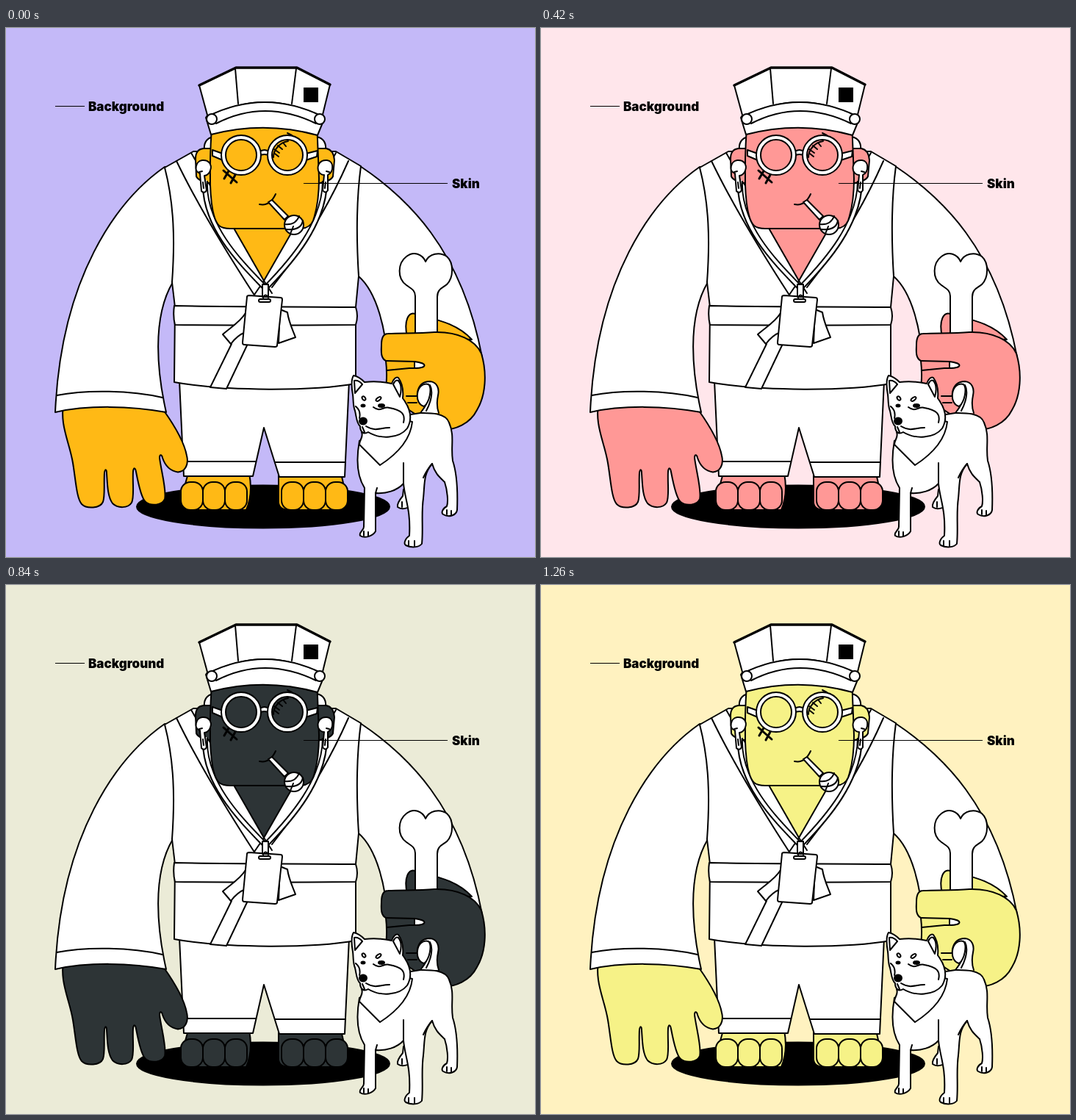
Write an HTML page that moves like this. It is 720x720 px and loops after 1400 ms.

```html
<!DOCTYPE html>
<html lang="en">
<head>
<meta charset="utf-8">
<title>Colour traits</title>
<style>
  html, body { margin: 0; width: 100%; height: 100%; overflow: hidden; }
  svg { display: block; width: 100vw; height: 100vh; }
  .ink { fill: #fff; stroke: #000; stroke-width: 2; stroke-linejoin: round; stroke-linecap: round; }
  .skin { fill: var(--skin); }
  .line { fill: none; }
  .solid { fill: #000; }
  text { font: 900 17px Inter, "Open Sans", sans-serif; }
  .bits { font: 7px "Noto Sans Mono", monospace; fill: #5bb4ff; }
</style>
</head>
<body>
<svg id="stage" viewBox="0 0 720 720">
  <defs>
    <linearGradient id="sky" x2="0" y2="1">
      <stop stop-color="#d0641f"/><stop offset=".4" stop-color="#e29d2f"/><stop offset=".85" stop-color="#fbdc4c"/><stop offset="1" stop-color="#fbdc4c"/>
    </linearGradient>
    <linearGradient id="dune" x2="0" y2="1">
      <stop stop-color="#fadb4b"/><stop offset="1" stop-color="#e7861f"/>
    </linearGradient>
    <linearGradient id="shade" x2="0" y2="1">
      <stop stop-color="#e08a28"/><stop offset="1" stop-color="#c95c22"/>
    </linearGradient>
    <radialGradient id="glow">
      <stop stop-color="#1c6cff" stop-opacity=".85"/><stop offset=".5" stop-color="#0c45d0" stop-opacity=".45"/><stop offset="1" stop-color="#0a36b0" stop-opacity="0"/>
    </radialGradient>
  </defs>

  <rect id="plain" width="720" height="720"/>

  <g id="desert">
    <rect width="720" height="330" fill="url(#sky)"/>
    <g fill="none" stroke="#fffad5" stroke-linejoin="round" stroke-linecap="round">
      <path transform="translate(45 10) skewX(-9.3)" stroke-width="72" d="M36 221V36H143V221"/>
      <path transform="translate(223 10) skewX(-9.3)" stroke-width="70" d="M35 35H126V210H35Z"/>
      <path transform="translate(385 10) skewX(-9.3)" stroke-width="70" d="M35 200V35H132V200"/>
      <path transform="translate(556 10) skewX(-9.3)" stroke-width="68" d="M34 34H124V180H34Z"/>
    </g>
    <g fill="#cbb9a2">
      <path d="M0 317C40 303 78 270 96 259C110 253 125 262 145 265L260 305V360H0Z"/>
      <path d="M557 335V238H562V184H569V190H574V179H584V135H587V140C600 134 605 146 614 141L633 143L627 149L633 154C615 160 605 147 587 153V179H594V188H599V179H605V185H612V232H622V214L632 184L641 212V265L645 280L652 291L646 305C680 287 695 312 720 317V345H540Z"/>
      <path d="M534 240L541 211L550 240V310H534Z"/>
    </g>
    <path fill="url(#dune)" d="M0 322C70 316 120 286 190 304C280 330 400 330 480 320C560 345 650 330 720 312V410H0Z"/>
    <path fill="url(#shade)" d="M470 350C510 340 560 360 610 372C650 386 690 385 720 388V415L500 445H470Z"/>
    <path fill="url(#dune)" d="M0 402C50 380 110 352 190 361C290 410 410 450 505 440C570 412 650 398 720 402V580H0Z"/>
    <path fill="url(#dune)" d="M0 549C100 544 200 550 330 545C470 540 600 528 720 525V720H0Z"/>
  </g>

  <g id="circuit">
    <rect width="720" height="720" fill="#041246"/>
    <g id="wires" fill="none"></g>
  </g>

  <g class="ink">
    <ellipse class="solid" cx="350" cy="651.500" rx="172" ry="29"/>

    <!-- feet and trousers -->
    <path class="skin" d="M248 606L243 624V656H327C334 640 334 622 331 606Z"/>
    <path class="skin" d="M371 606V646Q372 656 386 656H455L460 624L456 606Z"/>
    <g id="toes" class="skin"></g>
    <path d="M236 480L242 610H336L351 544L372 611H461L467 480Z"/>
    <path class="line" d="M241 590H340M366 591H462"/>

    <!-- resting arm -->
    <path class="skin" d="M79 506C72 540 86 562 91 592C95 616 96 640 103 648C110 655 128 654 132 645C135 637 133 620 134 605C135 600 137 600 137 606C138 620 138 638 145 647C152 654 166 654 171 646C175 638 172 620 173 603C174 598 176 598 177 604C180 620 184 640 190 645C197 651 213 650 216 641C219 630 211 602 209 585C209 580 212 580 213 585C217 597 224 603 234 604.500C244 604 249 594 246 582C243 566 232 545 215 521L208 506Z"/>
    <path d="M216 189C150 235 75 340 67 523C110 513 170 514 218 523C206 470 198 395 227 346L250 200Z"/>
    <path class="line" d="M69 500C110 492 170 493 213 503"/>

    <!-- raised arm -->
    <path d="M482 188C545 230 620 300 648 448L520 458C517 410 505 360 480 338L460 200Z"/>

    <!-- jacket -->
    <path d="M216 190L255 168H449L483 188C476 240 477 290 480 338L476 380V484C420 494 300 495 229 482L230 380L226 346C230 290 229 240 216 190Z"/>
    <path class="line" d="M232 181C258 235 300 305 339 365M252 170L280 218M466 181C440 240 404 300 362 353M449 170L420 222"/>
    <path class="skin" d="M304 262L351 344L398 262Z"/>
    <path class="line" d="M351 344L338 363M351 344L362 361"/>
    <path d="M229 378C310 380 390 379 476 380Q480 392 476 404C390 405 310 405 230 404Q227 392 229 378Z"/>
    <path d="M326 388C319 400 305 408 295 417L306 430C312 422 318 417 326 414ZM373 383L383 387C385 401 390 410 394 421L371 429Z"/>
    <path d="M307 430L278 489L300 491L328 432"/>

    <!-- ears -->
    <path d="M270 168Q268 151 282 148V168ZM435 168Q437 151 423 148V168Z"/>
    <path class="skin" d="M280 164H269Q258 165 258 178L259 202Q262 209 282 212ZM424 164H436Q446 166 447 180L445 202Q442 209 422 212Z"/>
  </g>

  <!-- lanyard -->
  <g fill="none">
    <path stroke="#000" stroke-width="8" d="M271 208C268 268 318 318 351 352M434 208C434 266 388 318 355 352"/>
    <path stroke="#fff" stroke-width="4" d="M271 207C268 268 318 318 352 353M434 207C434 266 388 318 354 353"/>
  </g>

  <g class="ink">
    <path d="M331 364L374 367Q376 367 376 370L369 432Q369 434 366 434L324 431Q322 431 322 428L328 366Q328 364 331 364Z"/>
    <rect x="349" y="349" width="8" height="17"/>
    <path class="line" d="M350 367Q353 360 357 367"/>
    <rect x="344" y="369" width="16" height="4" rx="2"/>

    <!-- face -->
    <path class="skin" d="M281 125C277 165 278 190 278 213C279 245 283 262 290 269Q295 273 305 273H402Q414 272 418 262C424 245 426 225 426 205L423 125Z"/>
    <path d="M264 198C255 195 258 181 267 180C276 179 281 186 278 194C277 198 273 201 270 201L273 221Q270 226 266 222Z"/>
    <path d="M438 200C447 195 446 181 437 180C428 179 423 186 425 194C427 199 431 200 433 200L431 221Q435 226 438 221Z"/>
    <path class="line" d="M263 196L267 195M440 196L436 195M268 210L269 218M435 210L434 218"/>
    <path class="line" d="M345 240Q359 243 367 226"/>
    <path d="M357 237L362 234L384 256L379 261Z"/>
    <circle cx="392" cy="268" r="13"/>
    <path class="line" d="M379 267Q394 269 399 256M381 274Q402 276 404 262M391 270L387 280"/>
    <path class="line" stroke-width="3" d="M296 194L314 210M297 205L304 193M306 211L312 200"/>

    <!-- glasses -->
    <path d="M281 166L295 171V180L281 174ZM424 167L408 171V180L423 175Z"/>
    <path d="M344 169Q352 163 359 169V174Q352 170 344 174Z"/>
    <circle cx="320" cy="173" r="27"/><circle cx="383" cy="173" r="27"/>
    <circle class="skin" cx="320" cy="173" r="21"/><circle class="skin" cx="383" cy="173" r="21"/>
    <path class="line" d="M364 176C364 166 372 156 384 154M365 165L372 170M370 160L376 165M377 156L381 161M366 171L371 175M383 143L389 146"/>

    <!-- cap -->
    <path d="M272 122L279 145Q352 126 424 146L433 124L426 110H280Z"/>
    <path d="M263 78L313 54H396L441 77L430 122Q352 80 275 122Z"/>
    <path class="line" stroke-width="3.500" d="M263 78L313 54H396L441 77"/>
    <path class="line" d="M312 55L316 103M395 55L389 103"/>
    <path d="M275 120Q352 82 430 120L422 130Q352 96 286 130Z"/>
    <circle cx="280" cy="124" r="7"/><circle cx="427" cy="124" r="7"/>
    <rect x="405" y="81" width="20" height="20" fill="#000" stroke="none"/>

    <!-- bone and gripping hand -->
    <path class="skin" d="M546 420C541 398 548 386 557 389C580 396 612 400 634 424Z"/>
    <path d="M557 418V365C557 356 550 354 545 350C532 341 533 320 545 311C555 303 567 308 571 318C576 307 590 304 600 311C610 320 609 340 600 349C594 354 587 355 587 366V418Z"/>
    <path class="skin" d="M520 416C540 415 560 416 583 414C615 413 639 425 647 443C655 470 653 500 641 520C632 538 612 548 590 547L518 500C516 485 520 478 517 453C509 449 511 438 511 431C511 421 514 416 520 416Z"/>
    <path class="line" d="M517 453L556 454M518 466L549 463L556 463"/>
    <path d="M556 454C574 456 574 463 556 463Z"/>

    <!-- dog -->
    <path d="M541 628L540 637C535 643 532 648 533 652C538 656 546 654 550 651L551 634Z"/>
    <path d="M564 524C568 519 570 516 572 512C561 513 559 504 560 496C562 485 569 481 577 481C587 482 590 491 588 500C586 510 586 516 589 524"/>
    <path d="M560 498C561 488 568 483 575 485C580 490 577 509 569 515C562 513 559 506 560 498Z"/>
    <path class="line" d="M577 486C582 495 578 510 572 521M545 501H559M547 510H559"/>
    <path d="M481 562C476 590 479 612 488 626L487 679C487 684 480 686 482 691C488 695 499 692 503 685V633C517 634 532 630 541 620C543 642 551 655 549 691C543 695 541 702 544 704C552 708 562 707 566 702C568 682 565 660 568 640C570 620 568 607 580 593C584 607 591 612 597 618C601 630 602 645 600 651C594 654 592 660 595 662C603 667 613 663 614 656C615 630 614 607 608 589C605 569 611 555 603 537C598 523 575 524 564 524L551 526Z"/>
    <path class="line" d="M541 592V620M568 612Q573 601 580 593M503 633L505 626M487 685V691M493 686V692M548 698V705M556 698V706M600 656V662M606 657V663M539 645V652"/>
    <path d="M484 550C487 557 481 560 481 567L509 595C526 584 550 565 553 536L544 534Z"/>
    <path d="M472 499C470 488 470 478 473 473C479 474 484 478 488 482Q507 480 525 484C527 478 531 474 534 476C540 484 541 494 540 504C552 520 553 533 546 545C535 559 509 560 493 550C486 554 482 549 482 542C477 538 477 529 475 521C472 514 473 506 472 499Z"/>
    <path class="line" d="M475 497L474 480Q480 479 485 485ZM527 485Q530 478 534 480C539 486 538 495 536 502ZM476 515C482 520 482 527 481 531M500 516C510 524 514 514 522 517C538 520 544 525 541 537M490 542C504 550 508 544 522 544M485 543L488 550"/>
    <ellipse class="solid" cx="486" cy="535" rx="5" ry="4.500"/>
    <ellipse class="solid" cx="486" cy="514" rx="2.500" ry="1.500"/>
    <ellipse class="solid" cx="511" cy="514" rx="4" ry="2"/>
    <ellipse cx="487" cy="504" rx="2" ry="3" transform="rotate(-35 487 504)"/>
    <ellipse cx="507" cy="505" rx="4" ry="2" transform="rotate(-35 507 505)"/>
  </g>

  <path d="M67 106.500H107M405 211.500H601" stroke="#000"/>
  <text x="112" y="113">Background</text>
  <text x="607" y="217.500">Skin</text>
</svg>
<script>
  const $ = id => document.getElementById(id);
  const STEP = 140;
  // backdrop (colour or scene), skin
  const looks = [
    ['#c4b9f8', '#ffb915'],
    ['#ffa066', '#6fd0f6'],
    ['#ffc3a9', '#b7b4c6'],
    ['#ffe6eb', '#ff9896'],
    ['desert', '#8ae8bb'],
    ['#edc88c', '#5c8e79'],
    ['#ebebd7', '#2d3436'],
    ['circuit', '#fba5ec'],
    ['#b9c4d8', '#f9ccba'],
    ['#fff2c0', '#f6f287']
  ];

  function add(parent, tag, attrs) {
    const el = document.createElementNS('http://www.w3.org/2000/svg', tag);
    for (const k in attrs) el.setAttribute(k, attrs[k]);
    parent.append(el);
    return el;
  }

  for (const x of [238, 375])
    for (let i = 0; i < 3; i++)
      add($('toes'), 'rect', { x: x + i * 30, y: 618, width: 30, height: 38, rx: 13 });

  let seed = 17;
  const rnd = () => (seed = seed * 16807 % 2147483647) / 2147483647;
  const wires = $('wires');

  function box(x, y, width, height) {
    add(wires, 'rect', { x, y, width, height, fill: '#06184d', stroke: '#2563bb' });
  }

  function chips(x, y, cols, rows, w, h) {
    for (let i = 0; i < cols * rows; i++) {
      const bx = x + i % cols * (w + 3), by = y + Math.floor(i / cols) * (h + 3);
      box(bx, by, w, h);
      add(wires, 'path', {
        d: `M${bx + 4} ${by + h * .3}h${w - 8}M${bx + 4} ${by + h * .7}h${w - 8}`,
        stroke: '#4c92e8', 'stroke-width': 2, 'stroke-dasharray': '2 5'
      });
    }
  }

  // parallel traces: straight, diagonal, straight
  function bundle(x, y, upright, turn) {
    const n = 3 + Math.floor(rnd() * 5), a = 20 + rnd() * 60, b = 40 + rnd() * 90, c = 30 + rnd() * 90;
    const s = turn * b;
    for (let i = 0; i < n; i++) {
      const o = i * 8, run = a - turn * o * .4;
      const d = upright ? `M${x + o} ${y}v${run}l${s} ${b}v${c}` : `M${x} ${y + o}h${run}l${b} ${s}h${c}`;
      const [cx, cy] = upright ? [x + o + s, y + run + b + c] : [x + run + b + c, y + o + s];
      add(wires, 'path', { d, stroke: rnd() < .3 ? '#5cb8ff' : '#2a74d4', 'stroke-width': 1.2 });
      add(wires, 'circle', { cx, cy, r: 1.6, fill: '#4ca5ff' });
    }
  }

  function beam(d) {
    [[18, '#1257ff', .18], [9, '#1e70ff', .3], [4, '#3a96ff', .6], [1.4, '#a9e2ff', 1]].forEach(([w, stroke, opacity]) =>
      add(wires, 'path', { d, stroke, opacity, 'stroke-width': w, 'stroke-linecap': 'round' }));
  }

  function fan(x) {
    box(x, 90, 69, 13);
    box(x, 103, 69, 69);
    for (let r = 4; r < 34; r += 3)
      add(wires, 'circle', { cx: x + 34, cy: 137, r, stroke: '#4a70a8', 'stroke-width': 1 });
    add(wires, 'path', { d: `M${x + 10} 113l48 48m0-48l-48 48`, stroke: '#06184d', 'stroke-width': 2 });
  }

  for (const [cx, cy, r] of [[140, 220, 190], [430, 60, 170], [660, 130, 120], [70, 390, 200], [600, 300, 200], [180, 600, 160], [520, 630, 190], [490, 380, 130]])
    add(wires, 'circle', { cx, cy, r, fill: 'url(#glow)' });

  for (let i = 0; i < 64; i++)
    bundle(rnd() * 780 - 70, rnd() * 760 - 60, rnd() < .3, rnd() < .5 ? -1 : 1);

  for (const [x, y] of [[500, 180], [610, 590], [620, 20]])
    add(wires, 'path', {
      d: Array.from({ length: 7 }, (_, i) => `M${x} ${y + i * 16}h110`).join(''),
      stroke: '#3578d0', 'stroke-width': 2, 'stroke-dasharray': '2 14'
    });

  chips(155, 85, 3, 2, 16, 26);
  chips(174, 143, 3, 2, 16, 25);
  chips(19, 205, 2, 2, 38, 29);
  chips(636, 390, 4, 1, 15, 25);
  chips(470, 425, 2, 2, 25, 28);
  chips(254, 660, 6, 2, 16, 15);
  fan(467);
  fan(547);
  beam('M110 150L180 220');
  beam('M408 0V48L448 88');
  beam('M0 490L75 415');
  beam('M130 720V650L215 565');
  beam('M510 720V650L570 590');
  beam('M590 371H720');
  beam('M500 235L560 295H720');
  for (let i = 0; i < 4; i++) {
    add(wires, 'path', { d: `M${14 + i * 16} ${425 + i % 2 * 6}l20 20`, stroke: '#2976d8', 'stroke-width': 9, 'stroke-linecap': 'round', opacity: .6 });
    add(wires, 'path', { d: `M${633 + i * 14} ${127 - i * 12}l24 24`, stroke: '#3a96ff', 'stroke-width': 7, 'stroke-linecap': 'round', opacity: .7 });
  }
  for (const [x, y, s] of [[3, 307, '01011010011010'], [690, 321, '0101101']])
    add(wires, 'text', { x, y, class: 'bits' }).textContent = s;

  const start = performance.now();
  function draw() {
    const i = Math.floor((performance.now() - start) / STEP) % looks.length;
    const [back, skin] = looks[i];
    $('stage').style.setProperty('--skin', skin);
    for (const id of ['desert', 'circuit']) $(id).style.display = back === id ? '' : 'none';
    if (back[0] === '#') $('plain').setAttribute('fill', back);
    requestAnimationFrame(draw);
  }
  draw();
</script>
</body>
</html>
```
